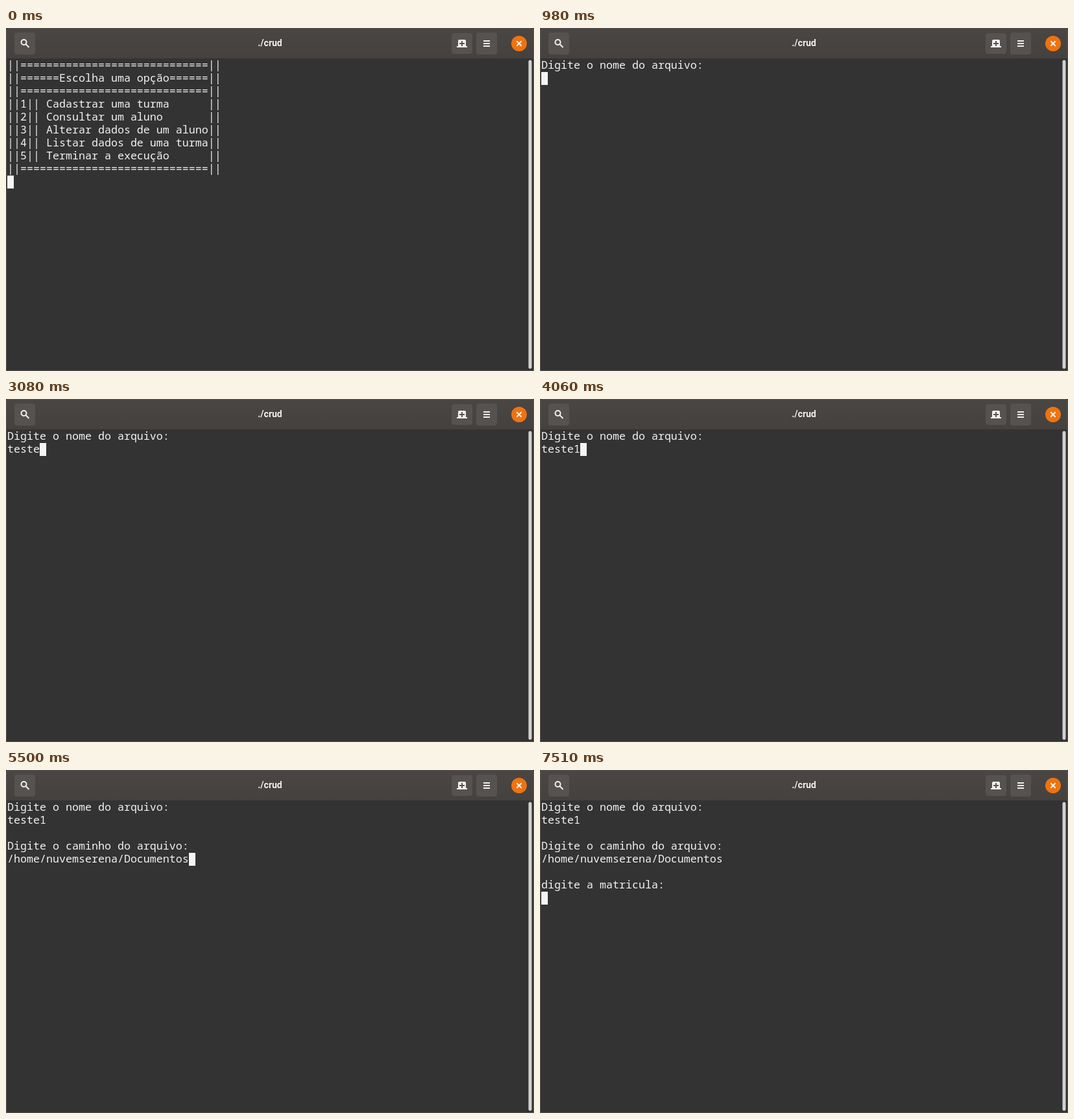
These frames come from a looping animation (814 px wide and 530 px high, 8 s). An HTML page:

```html
<!DOCTYPE html>
<html lang="pt">
<head>
<meta charset="utf-8">
<title>./crud</title>
<style>
html, body { margin: 0; width: 100%; height: 100%; overflow: hidden; background: #333; }
svg { display: block; }
#lines { font: 16.667px "Noto Sans Mono", "DejaVu Sans Mono", monospace; fill: #f2f2f2; }
#lines text { white-space: pre; }
.title { font: bold 14px Roboto, "Open Sans", sans-serif; fill: #f2f2f2; text-anchor: middle; }
.button { fill: #565250; }
.icon { fill: none; stroke: #f2f2f2; stroke-width: 2; }
</style>
</head>
<body>
<svg width="814" height="530" viewBox="0 0 814 530" xml:space="preserve">
  <defs>
    <linearGradient id="bar" x2="0" y2="1">
      <stop stop-color="#4a4643"/><stop offset="1" stop-color="#45413e"/>
    </linearGradient>
  </defs>
  <rect width="814" height="530" fill="#333"/>
  <path d="M0 47V4Q0 0 4 0H810Q814 0 814 4V47Z" fill="url(#bar)"/>
  <path d="M.5 530V4Q.5 .5 4 .5H810Q813.5 .5 813.5 4V530M0 529.5H814" fill="none" stroke="#565351"/>

  <rect class="button" x="13" y="7" width="32" height="34" rx="4"/>
  <circle class="icon" cx="27.5" cy="22" r="4"/>
  <path class="icon" d="M30.5 25L35.5 30"/>

  <text class="title" x="407" y="28">./crud</text>

  <rect class="button" x="687" y="8" width="32" height="32" rx="4"/>
  <path d="M697 28V20Q697 18 699 18H707Q709 18 709 20V28H711V30H695V28Z" fill="#f2f2f2"/>
  <path d="M699 24H707M703 20V28" stroke="#565250" stroke-width="2"/>

  <rect class="button" x="725" y="7" width="32" height="34" rx="4"/>
  <path class="icon" d="M736 20H746M736 24H746M736 28H746"/>

  <circle cx="791" cy="24" r="12" fill="#ee7310"/>
  <path class="icon" d="M787.3 20.3L794.7 27.7M794.7 20.3L787.3 27.7"/>

  <rect x="805.5" y="49.5" width="5" height="477" rx="2.5" fill="#d2d2d2"/>
  <g id="lines"></g>
  <rect id="cursor" width="10" height="20" fill="#f5f5f5"/>
</svg>
<script>
const LOOP = 8000, CELL = 10, ROW = 20, LEFT = 2, TOP = 48;

const rule = `||${'='.repeat(29)}||`;
const options = ['Cadastrar uma turma', 'Consultar um aluno', 'Alterar dados de um aluno',
  'Listar dados de uma turma', 'Terminar a execução'];
const menu = [rule, '||======Escolha uma opção======||', rule,
  ...options.map((label, i) => `||${i + 1}|| ${label.padEnd(25)}||`), rule, ''].join('\n');

const askName = 'Digite o nome do arquivo:\n';
const askPath = askName + 'teste1\n\nDigite o caminho do arquivo:\n';
const withPath = askPath + '/home/nuvemserena/Documentos';

// Screen contents by start time; the cursor follows the last character.
const screens = [
  [0, menu], [350, menu + '1'], [980, askName],
  ...[2230, 2470, 2720, 2920, 3080, 3450].map((t, i) => [t, askName + 'teste1'.slice(0, i + 1)]),
  [4130, askPath], [5500, withPath], [6400, withPath + '\n\ndigite a matricula:\n']
];

// Intervals in which the cursor is hidden.
const blinks = [[850, 910], [1480, 2080], [3970, 4050], [4650, 4800], [5640, 6230], [6920, 7510]];

const lines = document.getElementById('lines');
const cursor = document.getElementById('cursor');
let shown;

function show(content) {
  if (content === shown) return;
  shown = content;
  const rows = content.split('\n');
  lines.replaceChildren(...rows.map((row, i) => {
    const text = document.createElementNS('http://www.w3.org/2000/svg', 'text');
    text.setAttribute('x', LEFT);
    text.setAttribute('y', TOP + i * ROW + 15);
    text.textContent = row;
    return text;
  }));
  cursor.setAttribute('x', LEFT + rows.at(-1).length * CELL);
  cursor.setAttribute('y', TOP + (rows.length - 1) * ROW);
}

function draw(now) {
  const t = now % LOOP;
  show(screens.findLast(([start]) => start <= t)[1]);
  const hidden = blinks.some(([from, to]) => t >= from && t < to);
  cursor.setAttribute('visibility', hidden ? 'hidden' : 'visible');
}

const start = performance.now();
function tick() {
  draw(performance.now() - start);
  requestAnimationFrame(tick);
}
tick();
</script>
</body>
</html>
```
